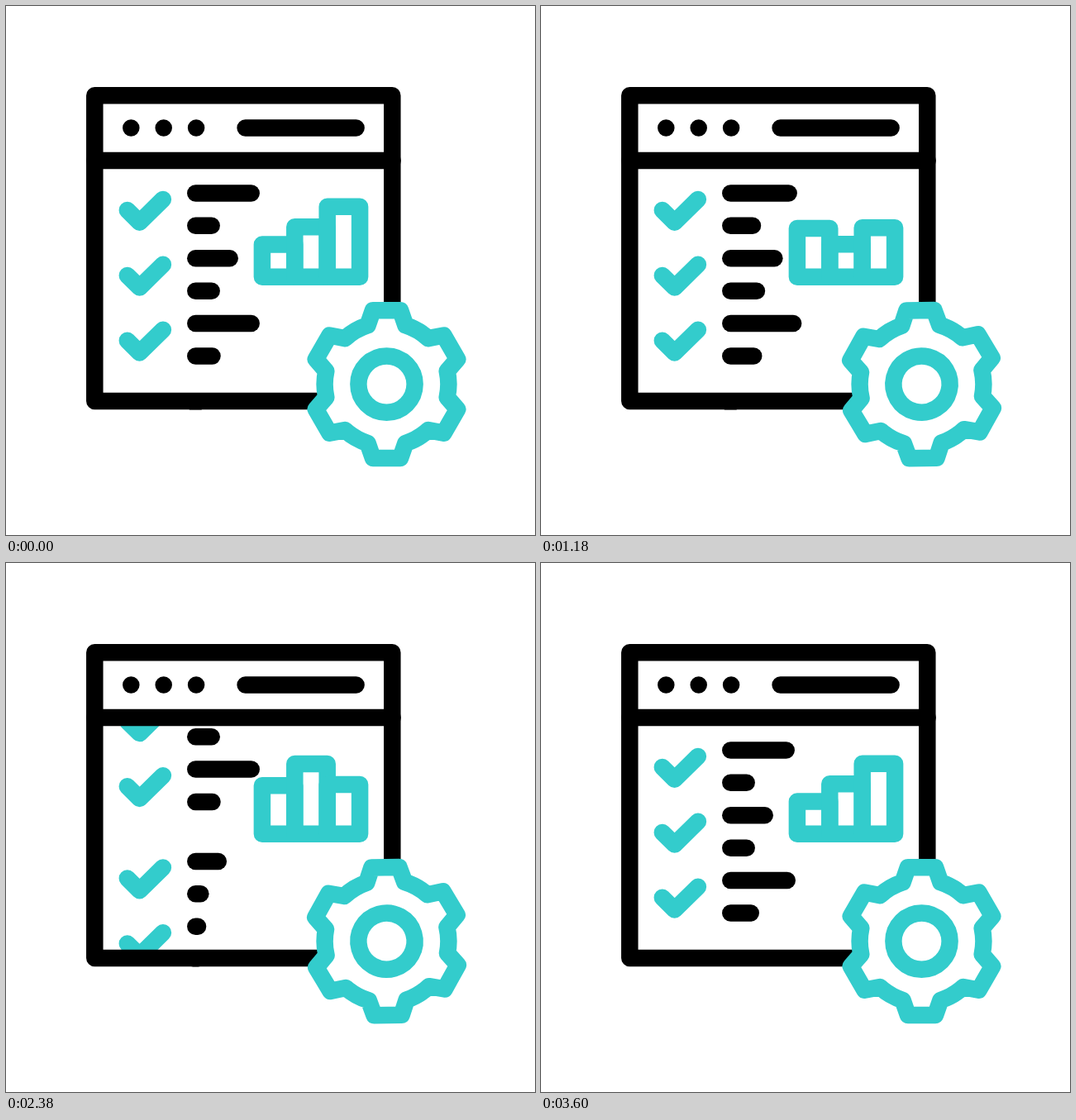
Animation of 640x640 px, one loop 3.62 s. Source, as an HTML page:

```html
<!DOCTYPE html>
<html lang="en">
<head>
<meta charset="utf-8">
<title>Task dashboard</title>
<style>
  html, body { margin: 0; width: 100%; height: 100%; overflow: hidden; background: #fff; }
  svg { display: block; width: 100vw; height: 100vh; }
  .ink, .teal { fill: none; stroke: #000; stroke-width: 20.5; stroke-linecap: round; stroke-linejoin: round; }
  .teal { stroke: #33cccc; }
</style>
</head>
<body>
<svg viewBox="0 0 640 640">
  <clipPath id="view"><rect x="107" y="187" width="360" height="301.6"/></clipPath>
  <g id="lists" clip-path="url(#view)"></g>
  <g class="ink">
    <rect x="107.3" y="108.3" width="360" height="369.6"/>
    <path d="M107.3 187H467.6M289.6 147.6H423.6M151.3 147.6h.01M190.7 147.6h.01M230.1 147.6h.01"/>
  </g>
  <g id="bars" class="teal"></g>
  <g id="gear" class="teal">
    <path id="rim" fill="#fff"/>
    <circle r="34.1"/>
  </g>
</svg>
<script>
const LOOP = 3620, STEP = 20;
const SCROLLS = [0, 1980], SCROLL_TIME = 800, PAGE = 269;
const LENGTHS = [67.4, 19.4, 41.4, 19.4, 67.4, 20.2];
const DELAYS = [68, 165, 285, 360, 452, 538];
const GROW = 840, SETTLE = 400, OVERSHOOT = 12.3;
const BAR_CYCLES = [0, 2000], BAR_STEP = 400, BAR_BASE = 327.8;
const BAR_TOPS = [
  [288.6, 269.2, 242.7, 269.2, 288.6],
  [267.3, 242.7, 267.3, 288.4, 267.3],
  [242.7, 268.2, 288.6, 268.2, 242.7]
];

const $ = id => document.getElementById(id);
const ease = u => { u = Math.min(1, Math.max(0, u)); return u * u * (3 - 2 * u); };

function add(parent, tag, attrs = {}) {
  const el = document.createElementNS('http://www.w3.org/2000/svg', tag);
  for (const key in attrs) el.setAttribute(key, attrs[key]);
  return parent.appendChild(el);
}

function makeList() {
  const group = add($('lists'), 'g');
  for (let i = 0; i < 3; i++)
    add(group, 'path', { class: 'teal', d: `M146.8 ${247 + 78.9 * i}l14.8 14.7l28.3 -27.8` });
  const lines = LENGTHS.map(() => add(group, 'path', { class: 'ink' }));
  return { group, lines };
}

function gearPath() {
  const r = 74.9, half = 17.8 * Math.PI / 180;
  let d = '';
  for (let i = 0; i < 6; i++) {
    const a = i * Math.PI / 3;
    const at = (x, y) =>
      `${(x * Math.cos(a) - y * Math.sin(a)).toFixed(2)} ${(x * Math.sin(a) + y * Math.cos(a)).toFixed(2)}`;
    const bx = r * Math.sin(half), by = -r * Math.cos(half);
    d += (i ? `A${r} ${r} 0 0 1 ` : 'M') + at(-bx, by);
    d += `L${at(-16.6, -89.4)}L${at(16.6, -89.4)}L${at(bx, by)}`;
  }
  return d + `A${r} ${r} 0 0 1 ${(-r * Math.sin(half)).toFixed(2)} ${(-r * Math.cos(half)).toFixed(2)}Z`;
}

function lineLength(i, t) {
  const peak = LENGTHS[i] + OVERSHOOT, u = t - DELAYS[i];
  return peak * ease(u / GROW) - OVERSHOOT * ease((u - GROW) / SETTLE);
}

function barTop(tops, t) {
  const u = Math.min(t / BAR_STEP, 4), k = Math.min(3, Math.floor(u));
  return tops[k] + (tops[k + 1] - tops[k]) * ease(u - k);
}

const lists = [-Infinity, ...SCROLLS].map(start => ({ start, ...makeList() }));
const bars = BAR_TOPS.map(() => add($('bars'), 'path'));
$('rim').setAttribute('d', gearPath());

function draw(t) {
  const scroll = SCROLLS.reduce((sum, s) => sum + ease((t - s) / SCROLL_TIME), 0);
  lists.forEach(({ start, group, lines }, k) => {
    group.setAttribute('transform', `translate(0 ${PAGE * (k - scroll)})`);
    lines.forEach((line, i) => {
      const w = Math.max(0.01, lineLength(i, t - start));
      line.setAttribute('d', `M229.3 ${226.4 + 39.43 * i}h${w}`);
    });
  });

  const cycle = t < BAR_CYCLES[1] ? BAR_CYCLES[0] : BAR_CYCLES[1];
  bars.forEach((bar, i) => {
    const x = 309.9 + 39.4 * i;
    bar.setAttribute('d', `M${x} ${BAR_BASE}V${barTop(BAR_TOPS[i], t - cycle)}h39.4V${BAR_BASE}Z`);
  });

  $('gear').setAttribute('transform', `translate(460.5 457.6) rotate(${t * 0.05})`);
}

let origin = null;
function tick(now) {
  if (origin === null) origin = now;
  const t = Math.max(0, now - origin) % LOOP;
  draw(Math.floor(t / STEP + 1e-6) * STEP);
  requestAnimationFrame(tick);
}
draw(0);
requestAnimationFrame(tick);
</script>
</body>
</html>
```
